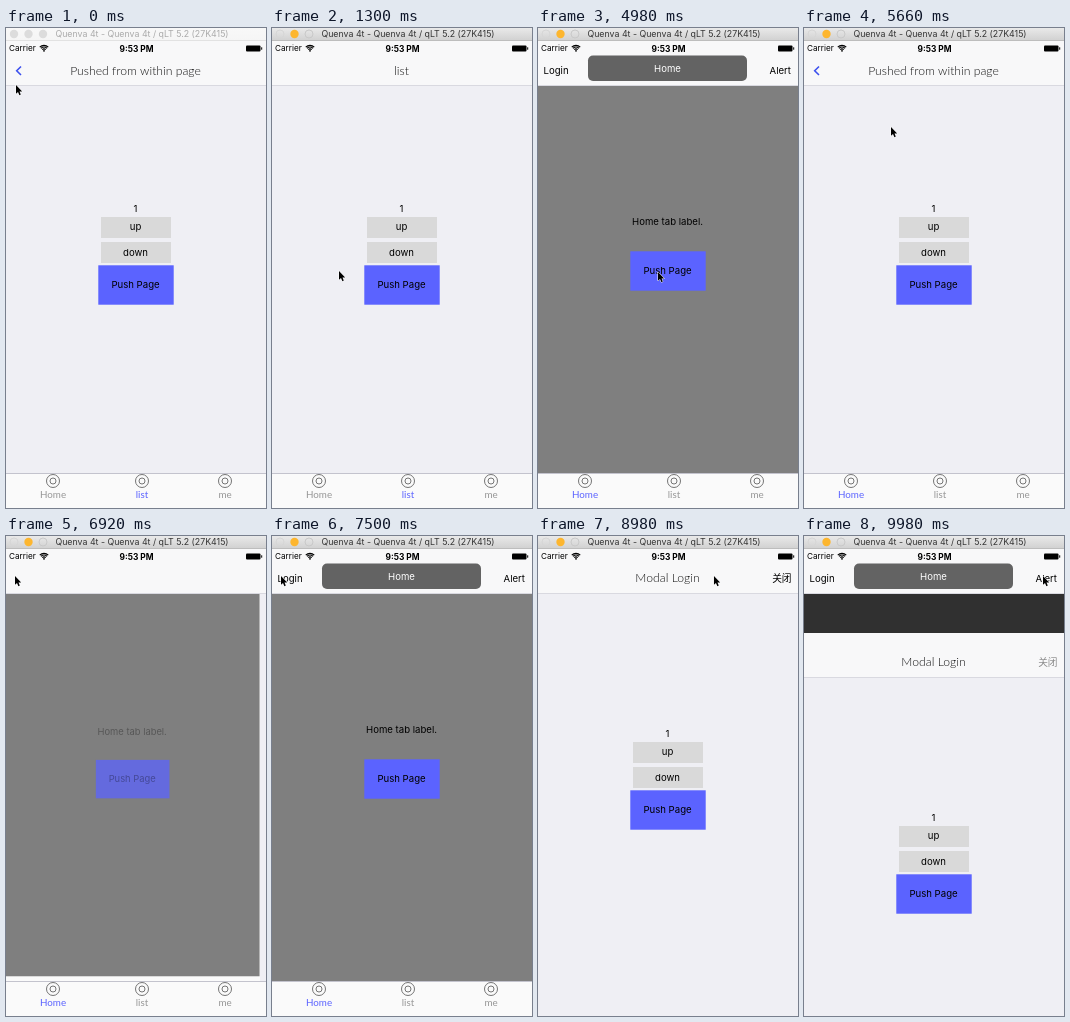
Animation, 260 px wide and 480 px high, one loop 10 s. Source, as an HTML page with a canvas:

```html
<!DOCTYPE html>
<html lang="en">
<head>
<meta charset="utf-8">
<style>
html, body { margin: 0; width: 100%; height: 100%; overflow: hidden; background: #fff; }
canvas { display: block; width: 260px; height: 480px; }
</style>
</head>
<body>
<canvas id="stage" width="260" height="480"></canvas>
<script>
const c = document.getElementById('stage').getContext('2d');
const LOOP = 10000, BLUE = '#5b63ff', PAGE = '#efeff4', BAR = '#f8f8f9';
const UI = 'Inter, "Noto Sans CJK SC", "Noto Sans CJK", sans-serif', HEAD = 'Lato, sans-serif';

const clamp = v => Math.min(1, Math.max(0, v));
const span = (t, start, length) => clamp((t - start) / length);
const easeOut = (u, power) => 1 - (1 - u) ** power;

// Pointer path: time, x, y of the tip
const pointer = [
  [0, 10, 57], [250, 10, 40], [750, 10, 40], [1300, 67, 243], [2900, 67, 243],
  [3650, 46, 456], [3900, 46, 456], [4700, 120, 244], [5160, 120, 244],
  [5660, 87, 99], [6100, 87, 99], [6600, 9, 40], [7500, 9, 40],
  [7850, 20, 40], [8400, 20, 40], [9300, 239, 40], [10000, 239, 40]
];

function rect(x, y, w, h, color) {
  c.fillStyle = color;
  c.fillRect(x, y, w, h);
}

function text(str, x, y, { size = 9.6, color = '#000', font = UI, align = 'center', weight = 400 } = {}) {
  c.font = `${weight} ${size}px ${font}`;
  c.fillStyle = color;
  c.textAlign = align;
  c.textBaseline = 'alphabetic';
  c.fillText(str, x, y + size * 0.36);
}

function faded(alpha, draw) {
  if (alpha <= 0) return;
  c.save();
  c.globalAlpha *= alpha;
  draw();
  c.restore();
}

function ring(x, y, r, color, width = 1) {
  c.beginPath();
  c.arc(x, y, r, 0, Math.PI * 2);
  c.strokeStyle = color;
  c.lineWidth = width;
  c.stroke();
}

function dot(x, y, r, color) {
  c.beginPath();
  c.arc(x, y, r, 0, Math.PI * 2);
  c.fillStyle = color;
  c.fill();
}

const heading = (str, y = 42.5) =>
  text(str, 129.5, y, { size: 12.2, font: HEAD, weight: 300, color: '#111' });

function counter() {
  text('1', 129.5, 181);
  rect(95, 189, 70, 21, '#d9d9d9');
  text('up', 129.5, 199);
  rect(95, 214, 70, 21, '#d9d9d9');
  text('down', 129.5, 224.5);
  rect(92.3, 237.3, 75.4, 39.4, BLUE);
  text('Push Page', 129.5, 257);
}

function homeContent(away) {
  const ink = `rgba(0,0,0,${1 - 1.2 * away})`;
  text('Home tab label.', 129.5, 194, { color: ink });
  rect(92.3, 223.3, 75.4, 39.4, BLUE);
  text('Push Page', 129.5, 243, { color: ink });
}

// The lower card shrinks and shifts left while another card covers it
function card(home, away) {
  const scale = 1 - 0.05 * away;
  c.save();
  c.translate(130 - 7 * away, 247);
  c.scale(scale, scale);
  c.translate(-130, -247);
  rect(0, 14, 260, 431, home ? '#7f7f7f' : PAGE);
  faded(1 - 0.54 * away, home ? () => homeContent(away) : counter);
  c.restore();
}

function pushedCard(x) {
  if (x >= 260) return;
  c.save();
  c.translate(Math.round(x), 0);
  rect(0, 57, 260, 388, PAGE);
  counter();
  c.restore();
}

function homeBar() {
  c.beginPath();
  c.roundRect(50, 27.5, 159, 25.5, 5);
  c.fillStyle = '#636363';
  c.fill();
  text('Home', 129.5, 40.5, { color: '#fff' });
  text('Login', 5.5, 43, { align: 'left' });
  text('Alert', 253, 43, { align: 'right' });
}

function pushedBar() {
  heading('Pushed from within page');
  c.beginPath();
  c.moveTo(15, 38.5);
  c.lineTo(10.7, 42.8);
  c.lineTo(15, 47);
  c.strokeStyle = '#3c50ee';
  c.lineWidth = 1.6;
  c.stroke();
}

function navBar(home, away) {
  rect(0, 13, 260, 44, BAR);
  rect(0, 57, 260, 1, '#d9d9e0');
  faded(clamp(1 - 2.5 * away), home ? homeBar : () => heading('list'));
  faded(clamp(2.2 * away - 1.2), pushedBar);
}

function tabBar(home) {
  rect(0, 445, 260, 35, '#fafafa');
  rect(0, 445, 260, 1, '#c3c3cd');
  [['Home', 47, home], ['list', 136, !home], ['me', 219, false]].forEach(([name, x, active]) => {
    ring(x, 453, 6.5, '#666', 0.9);
    ring(x, 453, 3, '#666', 0.9);
    text(name, x, 466, { size: 9.8, font: HEAD, color: active ? BLUE : '#969696' });
  });
}

function modal(top, pressed) {
  c.save();
  c.translate(0, Math.round(top));
  rect(0, 0, 260, 480, PAGE);
  rect(0, 0, 260, 44, BAR);
  rect(0, 44, 260, 1, '#d9d9e0');
  heading('Modal Login', 29);
  text('关闭', 253.5, 29.5, { align: 'right', size: 9.7, color: pressed ? '#8a8a8a' : '#000' });
  c.translate(0, 4);
  counter();
  c.restore();
}

function statusBar() {
  text('Carrier', 3, 20.5, { size: 8.2, align: 'left' });
  text('9:53 PM', 130.5, 20.5, { size: 8.4, weight: 700 });
  c.lineWidth = 1.2;
  c.strokeStyle = '#000';
  for (const r of [2.4, 4.2, 6]) {
    c.beginPath();
    c.arc(38, 23.3, r, -Math.PI * 0.75, -Math.PI * 0.25);
    c.stroke();
  }
  dot(38, 22.8, 0.9, '#000');
  c.beginPath();
  c.roundRect(240, 17.5, 14.5, 6, 1);
  c.fillStyle = '#000';
  c.fill();
  rect(255.2, 19.3, 1, 2.4, '#000');
}

function windowBar(active) {
  const shade = c.createLinearGradient(0, 0, 0, 13);
  shade.addColorStop(0, active ? '#e9e9e9' : '#f8f8f8');
  shade.addColorStop(1, active ? '#d0d0d0' : '#f5f5f5');
  rect(0, 0, 260, 13, shade);
  rect(0, 12, 260, 1, active ? '#bdbdbd' : '#e2e2e2');
  if (active) {
    ring(8, 6, 4, '#d6d6d6');
    dot(22.5, 6, 4.2, '#fdb62f');
    ring(37, 6, 4, '#c9c9c9');
  } else {
    [8, 22.5, 37].forEach(x => dot(x, 6, 4.2, '#dcdcdc'));
  }
  text('Quenva 4t - Quenva 4t / qLT 5.2 (27K415)', 136, 6, { size: 8.8, color: active ? '#333' : '#aaa' });
}

function drawPointer(t) {
  const i = pointer.findIndex((p, n) => n && t <= p[0]);
  const [t0, x0, y0] = pointer[i - 1], [t1, x1, y1] = pointer[i];
  let u = span(t, t0, t1 - t0);
  u = u * u * (3 - 2 * u);
  c.save();
  c.translate(x0 + (x1 - x0) * u, y0 + (y1 - y0) * u);
  const arrow = new Path2D('M0 0V8.8L2 7L3.4 10.2L4.8 9.6L3.5 6.5H6.2Z');
  c.strokeStyle = '#fff';
  c.lineWidth = 1;
  c.stroke(arrow);
  c.fillStyle = '#000';
  c.fill(arrow);
  c.restore();
}

function draw(t) {
  const home = t >= 3750;
  let away, slide;
  if (!home || t >= 6660) {
    const u = span(t, home ? 6660 : 450, 500);
    away = 1 - u;
    slide = easeOut(u, 5);
  } else {
    away = span(t, 5160, 480);
    slide = 1 - easeOut(away, 5);
  }
  const open = easeOut(span(t, 8071, 500), 3) - easeOut(span(t, 9949, 500), 3);

  rect(0, 0, 260, 480, '#fafafa');
  card(home, away);
  pushedCard(260 * slide);
  if (open > 0) rect(0, 57, 260, 388, `rgba(0,0,0,${0.62 * clamp(open * 3)})`);
  navBar(home, away);
  tabBar(home);
  if (open > 0) modal(13 + 467 * (1 - open), t > 9880);
  statusBar();
  windowBar(t >= 300);
  drawPointer(t);
}

const begin = performance.now();
function tick() {
  draw((performance.now() - begin) % LOOP);
  requestAnimationFrame(tick);
}
tick();
</script>
</body>
</html>
```
